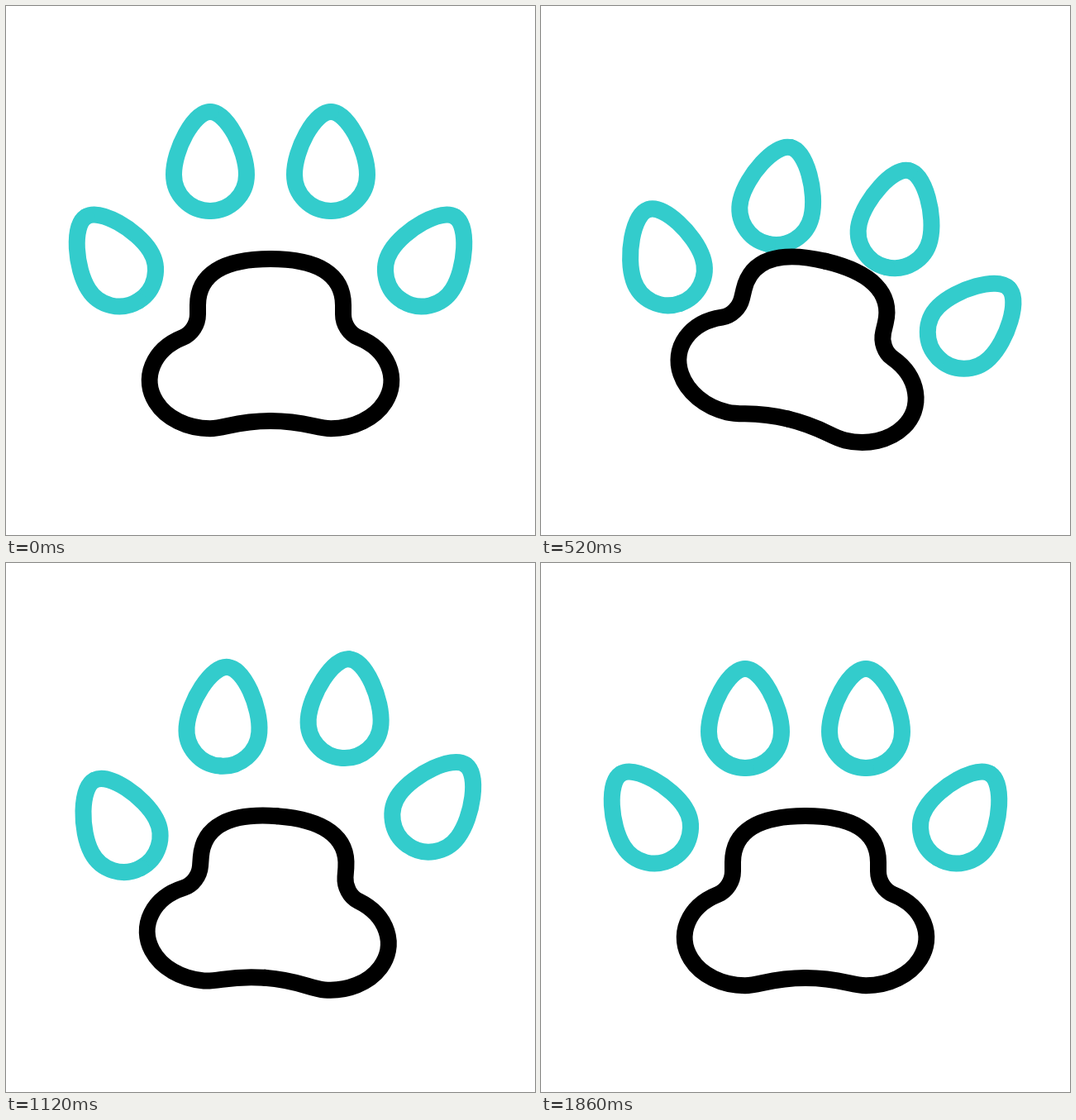
These frames come from a looping animation (640x640 px, 2400 ms). An HTML page with a canvas:

```html
<!DOCTYPE html>
<html lang="en">
<head>
<meta charset="utf-8">
<title>Paw</title>
<style>
html, body { margin: 0; width: 100%; height: 100%; overflow: hidden; background: #fff; }
canvas { display: block; width: 640px; height: 640px; }
</style>
</head>
<body>
<canvas id="stage" width="640" height="640"></canvas>
<script>
const ctx = document.getElementById('stage').getContext('2d');
const LOOP = 2400, STEP = 20;
const TEAL = '#33cccc', BLACK = '#000';
const PIVOT = { x: 320, y: 410 };

const rad = deg => deg * Math.PI / 180;
const smooth = p => p * p * (3 - 2 * p);
const smoother = p => p * p * p * (10 - 15 * p + 6 * p * p);

// Turning points of each motion: [time, value]
const swing = [[0, 0], [445, 15], [802, -8.7], [1120, 4.3], [1370, -2.2], [1610, 0]];
const bob = [[0, 0], [405, 54], [818, -28], [1230, 36.5], [1560, 0]];

function valueAt(keys, t, ease) {
  if (t <= 0) return keys[0][1];
  const i = keys.findIndex(key => t < key[0]);
  if (i < 0) return keys[keys.length - 1][1];
  const [a, from] = keys[i - 1], [b, to] = keys[i];
  return from + (to - from) * ease((t - a) / (b - a));
}

// Right half of a toe, around the centre of its round end
const egg = new Path2D();
egg.moveTo(0, -76);
egg.bezierCurveTo(20, -76, 44, -30, 44, 0);
egg.arc(0, 0, 44, 0, rad(90));

// Right half of the pad, around the middle of the stage
const pad = new Path2D();
pad.moveTo(0, 306);
pad.bezierCurveTo(58, 306, 88, 325, 88, 362);
pad.lineTo(88, 373);
pad.bezierCurveTo(88, 385, 95.5, 396.8, 106, 401);
pad.ellipse(73.2, 453, 73.1, 58.2, 0, rad(-63.3), rad(90));
pad.bezierCurveTo(55, 511.2, 42, 502, 0, 502);

function strokeBoth(half, color) {
  ctx.strokeStyle = color;
  ctx.stroke(half);
  ctx.scale(-1, 1);
  ctx.stroke(half);
}

function drawToe(i, t) {
  const side = i < 2 ? -1 : 1;
  const outer = i % 3 === 0;
  const lift = valueAt(bob, t - 6 - 97 * i, smooth);
  ctx.save();
  ctx.translate(320 + side * (outer ? 183 : 73), (outer ? 319.5 : 204) + lift);
  ctx.rotate(rad(outer ? side * 32 : 0));
  strokeBoth(egg, TEAL);
  ctx.restore();
}

function draw(t) {
  ctx.setTransform(1, 0, 0, 1, 0, 0);
  ctx.fillStyle = '#fff';
  ctx.fillRect(0, 0, 640, 640);
  ctx.lineWidth = 20;
  ctx.lineJoin = ctx.lineCap = 'round';

  ctx.translate(PIVOT.x, PIVOT.y);
  ctx.rotate(rad(valueAt(swing, t, smoother)));
  ctx.translate(-PIVOT.x, -PIVOT.y);

  for (let i = 0; i < 4; i++) drawToe(i, t);
  ctx.translate(320, 0);
  strokeBoth(pad, BLACK);
}

const begin = performance.now();
function tick() {
  const t = (performance.now() - begin) % LOOP;
  draw(Math.floor(t / STEP) * STEP);
  requestAnimationFrame(tick);
}
draw(0);
requestAnimationFrame(tick);
</script>
</body>
</html>
```
